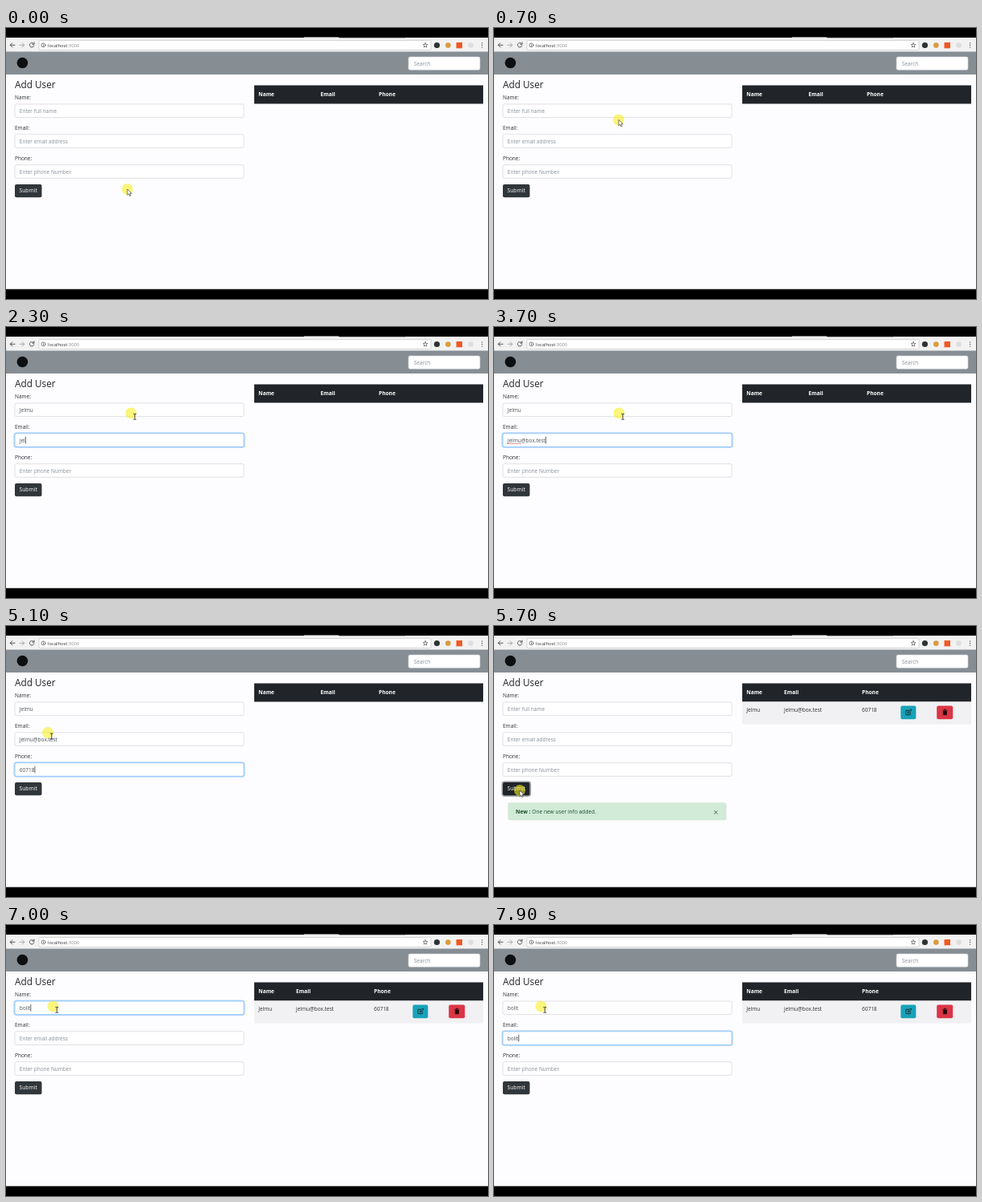
Animation of 600 by 338 pixels, one loop 8000 ms. Source, as an HTML page:

```html
<!DOCTYPE html>
<html lang="en">
<head>
<meta charset="utf-8">
<title>Add User</title>
<style>
  html, body { margin: 0; width: 100%; height: 100%; overflow: hidden; background: #fdfcfe; }
  svg { display: block; width: 600px; height: 338px; }
  text { font: 6.5px "Open Sans", "Noto Sans", sans-serif; fill: #2b3035; white-space: pre; }
  .bold { font-weight: 700; }
  .head { font-weight: 700; font-size: 6.6px; fill: #fff; }
  .hint { fill: #868e96; }
  .line { fill: none; stroke: #555; stroke-linecap: round; stroke-linejoin: round; }
  .input rect { fill: #fff; stroke: #d3d5d9; stroke-width: .7; }
  .input .ring { fill: none; stroke: #007bff; stroke-opacity: .27; stroke-width: 1.5; visibility: hidden; }
  .input .caret { fill: #222; stroke: none; }
  .input .value { fill: #495057; }
  .input.focus .box { stroke: #72b8f4; }
  .input.focus .ring { visibility: visible; }
</style>
</head>
<body>
<svg viewBox="0 0 600 338">
  <rect width="600" height="338" fill="#fdfcfe"/>

  <g id="browser">
    <rect width="600" height="12" fill="#000"/>
    <rect y="12" width="600" height="17.5" fill="#f2f2f2"/>
    <rect x="371" y="11.4" width="43" height=".8" fill="#ddd"/>
    <rect x="415" y="11.9" width="82" height=".6" fill="#777"/>
    <rect x="41" y="15.6" width="488" height="11.8" rx="1.2" fill="#fff" stroke="#c6c6c6" stroke-width=".7"/>
    <path class="line" d="M11 21.3H5.2M7.8 18.7L5.2 21.3L7.8 23.9"/>
    <path class="line" style="stroke:#a9a9a9" d="M17 21.3h5.8M20.2 18.7l2.6 2.6l-2.6 2.6"/>
    <path class="line" d="M34.6 19.8a2.8 2.8 0 1 0 .3 2.2M35 18v2.2h-2.2"/>
    <circle class="line" cx="46.5" cy="21.4" r="2.5" stroke-width=".7"/>
    <path class="line" stroke-width=".8" d="M46.5 21.2v1.4M46.5 20v.1"/>
    <text x="52" y="23.7" style="font-size:5.8px">localhost<tspan fill="#8a8a8a">:3000</tspan></text>
    <path class="line" stroke-width=".7" d="M522 18.5l.8 2l2.1.1l-1.6 1.4l.5 2.1l-1.8-1.1l-1.8 1.1l.5-2.1l-1.6-1.4l2.1-.1z"/>
    <circle cx="536.4" cy="21.5" r="3.6" fill="#2e3431"/>
    <circle cx="550.3" cy="21.6" r="3.3" fill="#dc9a3c"/>
    <rect x="560.5" y="18" width="7.5" height="7.3" fill="#ef5a24"/>
    <circle cx="578.5" cy="21.5" r="3.3" fill="#dedede"/>
    <path class="line" stroke-width="1.4" d="M592.6 18.9v.01M592.6 21.5v.01M592.6 24.1v.01"/>
  </g>

  <rect y="29.5" width="600" height="28.5" fill="#868e94"/>
  <circle cx="20.4" cy="43.5" r="6.8" fill="#0c0e10"/>
  <rect x="501" y="36" width="89" height="16.3" rx="2" fill="#fff" stroke="#d3d5d9" stroke-width=".6"/>
  <text class="hint" x="507.8" y="46.5">Search</text>

  <text x="11" y="75.2" style="font-size:11.8px;font-weight:500;fill:#212529">Add User</text>
  <g id="form"></g>

  <g id="submit">
    <rect id="btnRing" x="10.3" y="194.3" width="35" height="17.6" rx="2.6" fill="none" stroke="#343a40" stroke-opacity=".5" stroke-width="1.6"/>
    <rect id="btn" x="11" y="195" width="33.5" height="16.2" rx="2"/>
    <text x="16.6" y="205.4" style="font-size:6.7px;fill:#fff">Submit</text>
  </g>

  <g id="alert">
    <rect x="17.3" y="220.3" width="272" height="21.9" rx="2" fill="#d2ebd8"/>
    <text x="27" y="233.8" style="font-size:6.65px;fill:#1b4d2a"><tspan class="bold">New :</tspan> One new user info added.</text>
    <path class="line" style="stroke:#4f6355" d="M274.3 230.5l3.8 3.8M278.1 230.5l-3.8 3.8"/>
  </g>

  <rect x="309" y="71.5" width="285" height="23" fill="#212529"/>
  <text class="head" x="314.3" y="85.4">Name</text>
  <text class="head" id="colEmail" y="85.4">Email</text>
  <text class="head" id="colPhone" y="85.4">Phone</text>
  <g id="row">
    <rect x="309" y="94.5" width="285" height="28.2" fill="#f1f0f2"/>
    <text x="314.3" y="107.3">Jelmu</text>
    <text x="361" y="107.3">jelmu@box.test</text>
    <text x="458" y="107.3">60718</text>
    <rect x="506.3" y="99.5" width="19" height="16.8" rx="2" fill="#17a2b8"/>
    <path class="line" style="stroke:#16282c" stroke-width=".9" d="M516.4 105.3h-3.6v5.4h5.4v-2.6M515.2 108.5l.3-1.5l3.2-3.2l1.2 1.2l-3.2 3.2z"/>
    <rect x="551.2" y="99.5" width="20" height="16.8" rx="2" fill="#dc3545"/>
    <path d="M558.3 104.7h1.7l.4-.9h1.8l.4.9h1.7v.9h-6zM558.8 106.1h5v4.3q0 .9-.9.9h-3.2q-.9 0-.9-.9z" fill="#23090c"/>
  </g>

  <g id="mouse">
    <circle r="7" fill="#f9ee24" fill-opacity=".6"/>
    <path id="arrow" d="M0 0V7.4L1.8 5.8L3 8.6L4.3 8L3.1 5.3H5.4Z" fill="#fff" stroke="#222" stroke-width=".6"/>
    <path id="beam" class="line" style="stroke:#222" stroke-width=".8" d="M3.3 1h1l.5.4l.5-.4h1M4.8 1.4v6M3.3 7.8h1l.5-.4l.5.4h1"/>
  </g>

  <rect y="325.7" width="600" height="12.3" fill="#000"/>
</svg>
<script>
const LOOP = 8000, STEP = 100;
const $ = id => document.getElementById(id);
const show = (el, on) => el.style.visibility = on ? "visible" : "hidden";

const fields = [
  { label: "Name:", hint: "Enter full name", y: 95 },
  { label: "Email:", hint: "Enter email address", y: 132.8 },
  { label: "Phone:", hint: "Enter phone Number", y: 170.7 }
];

// Each entry: field, text, first keystroke, time per key, time it is cleared
const typing = [
  [0, "Jelmu", 1200, 100, 5600],
  [1, "jelmu@box.test", 2000, 130, 5600],
  [2, "60718", 4500, 130, 5600],
  [0, "bolit", 6600, 100, LOOP],
  [1, "bolit", 7500, 100, LOOP]
];

// Focus changes: time and field index, -1 none, 3 the button
const focusSteps = [[0, -1], [900, 0], [1800, 1], [4100, 2], [5500, 3], [6400, 0], [7400, 1]];

const path = [
  [0, 151, 201], [200, 151, 201], [800, 155.5, 107.5], [4600, 155.5, 107.5],
  [5100, 52, 133], [5400, 32, 205], [5800, 32, 205], [6300, 58.5, 101.5], [LOOP, 58.5, 101.5]
];

$("form").innerHTML = fields.map(f => `
  <text x="11" y="${f.y - 6.2}">${f.label}</text>
  <g class="input">
    <rect class="ring" x="10.2" y="${f.y - .8}" width="286.6" height="18.2" rx="2.8"/>
    <rect class="box" x="11" y="${f.y}" width="285" height="16.6" rx="2"/>
    <text class="hint" x="16.8" y="${f.y + 10.9}">${f.hint}</text>
    <text class="value" x="16.8" y="${f.y + 10.9}"></text>
    <path class="wave" fill="none" stroke="#e0403c" stroke-width=".8" stroke-dasharray="1.2 .5"/>
    <rect class="caret" y="${f.y + 4}" width=".7" height="8.6"/>
  </g>`).join("");

document.querySelectorAll(".input").forEach((g, i) => {
  const f = fields[i];
  f.group = g;
  for (const part of ["hint", "value", "wave", "caret"]) f[part] = g.querySelector("." + part);
});

function mouseAt(t) {
  const i = path.findIndex(p => p[0] > t);
  const [t0, x0, y0] = path[i - 1], [t1, x1, y1] = path[i];
  const k = (t - t0) / (t1 - t0), e = k * k * (3 - 2 * k);
  return [x0 + (x1 - x0) * e, y0 + (y1 - y0) * e];
}

function drawField(f, i, t, focus, since) {
  let text = "", lastKey = since;
  for (const [field, full, start, pace, end] of typing) {
    if (field !== i || t < start || t >= end) continue;
    const n = Math.min(full.length, Math.floor((t - start) / pace) + 1);
    text = full.slice(0, n);
    lastKey = Math.max(lastKey, start + (n - 1) * pace);
  }
  const active = focus === i;
  f.group.classList.toggle("focus", active);
  f.value.textContent = text;
  show(f.hint, !text);
  show(f.caret, active && (t - lastKey) % 1000 < 500);
  f.caret.setAttribute("x", 17 + (text ? f.value.getComputedTextLength() : 0));
  const misspelt = active && text.includes("@");
  show(f.wave, misspelt);
  if (misspelt) {
    const w = f.value.getSubStringLength(0, text.indexOf("@"));
    f.wave.setAttribute("d", `M16.8 ${f.y + 12.7}h${w}`);
  }
}

function draw(t) {
  const [since, focus] = focusSteps.filter(s => s[0] <= t).pop();
  fields.forEach((f, i) => drawField(f, i, t, focus, since));

  const [x, y] = mouseAt(t);
  const inside = (top, h, right) => x > 11 && x < right && y > top && y < top + h;
  const overInput = fields.some(f => inside(f.y, 16.6, 296));
  $("mouse").setAttribute("transform", `translate(${x} ${y})`);
  show($("beam"), overInput);
  show($("arrow"), !overInput);

  $("btn").setAttribute("fill", inside(195, 16.2, 44.5) ? "#202428" : "#31363a");
  show($("btnRing"), focus === 3);

  const added = t >= 5600;
  show($("row"), added);
  show($("alert"), t >= 5700 && t < 6700);
  $("colEmail").setAttribute("x", added ? 361 : 391.5);
  $("colPhone").setAttribute("x", added ? 458 : 464);
}

const begin = performance.now();
function tick() {
  const t = (performance.now() - begin) % LOOP;
  draw(Math.floor(t / STEP) * STEP);
  requestAnimationFrame(tick);
}
tick();
</script>
</body>
</html>
```
